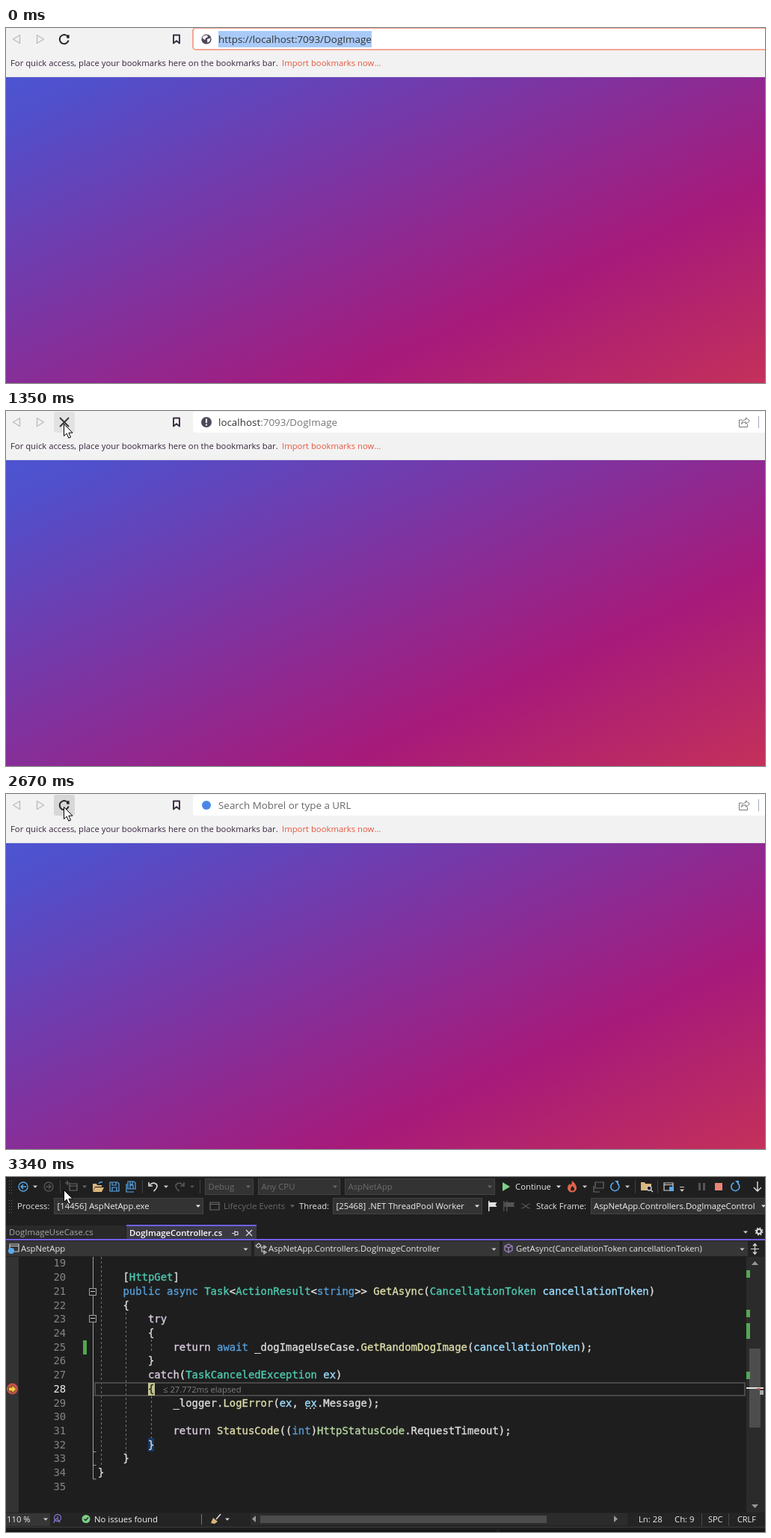
An HTML page that plays this animation: 1015x476 px, repeating every 4.84 s.

```html
<!DOCTYPE html>
<html lang="en">
<head>
<meta charset="utf-8">
<title>Cancelled request</title>
<style>
html, body { margin: 0; width: 100%; height: 100%; overflow: hidden; background: #1f1f1f; }
svg { display: block; width: 1015px; height: 476px; }
text { white-space: pre; font-family: "Open Sans", "Noto Sans", sans-serif; }
.code { font-family: "DejaVu Sans Mono", monospace; font-size: 13.91px; stroke-width: .35; }
</style>
</head>
<body>
<svg id="stage" viewBox="0 0 1015 476" xmlns="http://www.w3.org/2000/svg">
  <defs>
    <linearGradient id="sky" gradientUnits="userSpaceOnUse" x1="0" y1="66" x2="336" y2="792">
      <stop offset="0" stop-color="#4d54d1"/>
      <stop offset=".065" stop-color="#5050cc"/>
      <stop offset=".7" stop-color="#a71a7a"/>
      <stop offset="1" stop-color="#c4315a"/>
    </linearGradient>
  </defs>
</svg>
<script>
const stage = document.getElementById('stage');
const LOOP = 4840;
const groups = {};
let g = stage;

function el(tag, attrs, text, parent = g) {
  const node = document.createElementNS(stage.namespaceURI, tag);
  for (const k in attrs) node.setAttribute(k, attrs[k]);
  if (text) node.textContent = text;
  return parent.appendChild(node);
}
function group(name, parent = stage) {
  g = groups[name] = el('g', {}, '', parent);
}
const rect = (x, y, width, height, fill, more) => el('rect', { x, y, width, height, fill, ...more });
const dot = (cx, cy, r, fill, more) => el('circle', { cx, cy, r, fill, ...more });
const line = (d, stroke, w = 1, more) => el('path', { d, stroke, 'stroke-width': w, fill: 'none', ...more });
const fill = (d, color, more) => el('path', { d, fill: color, ...more });
const label = (x, y, str, color, size = 11.3, more) => el('text', { x, y, fill: color, 'font-size': size, ...more }, str);
const caret = (x, y, color = '#d0d0d0') => fill(`M${x - 3} ${y - 1.5}h6l-3 3.2z`, color);
const ring = (x, y, r, color) => dot(x, y, r, 'none', { stroke: color, 'stroke-width': 1.3 });
const frame = (x, y, w, h, bg, stroke, more) => rect(x + .5, y + .5, w - 1, h - 1, bg, { stroke, ...more });

/* ---------- browser ---------- */
function browser() {
  group('browser');
  const top = g;
  rect(0, 0, 1015, 66, '#f2f2f2');
  rect(0, 65, 1015, 1, '#dcdce4');
  rect(0, 66, 1015, 410, 'url(#sky)');

  group('hover', top);
  rect(64, 1, 28, 28, '#e2e2e2', { rx: 3 });
  group('press', top);
  rect(64, 1, 28, 28, '#d7d7d7', { rx: 3 });

  g = top;
  line('M18.5 9.5v11l-9-5.5z', '#bdbdbd', 1.4, { 'stroke-linejoin': 'round' });
  line('M41.5 9.5v11l9-5.5z', '#bdbdbd', 1.4, { 'stroke-linejoin': 'round' });
  line('M224 9.5h8v11l-4-3.4-4 3.4z', '#3b2c42', 1.9, { 'stroke-linejoin': 'round' });
  label(6, 51, 'For quick access, place your bookmarks here on the bookmarks bar.', '#38243f');
  label(369, 51, 'Import bookmarks now…', '#e5573f');

  group('reload', top);
  line('M83.6 16.5a6 6 0 1 1-3.3-6.8', '#262626', 2);
  fill('M80 9.2h4.6v4.6h-3z', '#262626');
  group('stop', top);
  line('M72 9l12 12M84 9l-12 12', '#333', 1.8);

  group('focused', top);
  rect(250, 0, 780, 29, '#fff', { rx: 4, stroke: '#f6a795', 'stroke-width': 2 });
  rect(284, 4, 205, 22, '#a9caf8');
  label(284, 20, 'https://localhost:7093/DogImage', '#333', 13.42);
  dot(268, 15, 6.6, '#50465a');
  fill('M264 10.5l5-1 1 2.5-3 1.5-1 2.5-3.5-2.5zM269 15l4.5-1.5-1 4-3 2.5z', '#fff');

  group('idle', top);
  const idle = g;
  rect(250, 1, 780, 28, '#fff', { rx: 4 });
  line('M984.5 12h-4v9.5h11v-4M983.5 17.5q1-6 6-6v-2.5l5 4.2-5 4.2v-2.7q-4-.2-6 2.8z', '#777');
  rect(1006, 7, 1, 16, '#a4a8c0');

  group('visited', idle);
  dot(268, 15, 7, '#4f4a5a');
  rect(267, 10.5, 2, 5.5, '#fff');
  rect(267, 17.5, 2, 2, '#fff');
  const url = label(284, 20, '', '#777', 13.42);
  el('tspan', { fill: '#333' }, 'localhost', url);
  el('tspan', {}, ':7093/DogImage', url);

  group('search', idle);
  dot(268, 15, 6, '#4a86e8');
  label(284, 20, 'Search Mobrel or type a URL', '#686868', 13.42);

  group('tip', top);
  frame(87, 32, 136, 25, '#fff', '#4a4a4a');
  label(95, 49, 'Stop loading this page', '#444');
}

/* ---------- editor ---------- */
const INK = {
  p: '#dcdcdc', b: '#569cd6', c: '#dacbe0', t: '#4ec9b0',
  e: '#b8d7a3', m: '#dcdcaa', v: '#9cdcfe', dark: '#2b2b20'
};
const CODE = [
  [20, 8, 'p[|tHttpGet|p]'],
  [21, 8, 'bpublic async |tTask|p<|tActionResult|p<|bstring|p>> |mGetAsync|p(|tCancellationToken |vcancellationToken|p)'],
  [22, 8, 'p{'],
  [23, 12, 'ctry'],
  [24, 12, 'p{'],
  [25, 16, 'creturn |bawait |p_dogImageUseCase.|mGetRandomDogImage|p(|vcancellationToken|p);'],
  [26, 12, 'p}'],
  [27, 12, 'ccatch|p(|tTaskCanceledException |vex|p)'],
  [28, 12, 'p{'],
  [29, 16, 'p_logger.|mLogError|p(|vex|p, |vex|p.Message);'],
  [31, 16, 'creturn |mStatusCode|p((|bint|p)|eHttpStatusCode|p.RequestTimeout);'],
  [32, 12, 'p}'],
  [33, 8, 'p}'],
  [34, 4, 'p}']
];
const rowY = n => Math.round(120.4 + 18.72 * (n - 19));
const colX = c => 89.4 + 8.376 * c;

function codeRow(n, col) {
  return el('text', { class: 'code', x: colX(col), y: rowY(n) });
}
const token = (row, str, color) => el('tspan', { fill: color, stroke: color }, str, row);

function combo(x, y, w, str, color, arrow = color) {
  frame(x, y, w, 22, '#333', '#434343');
  label(x + 4.5, y + 15, str, color);
  caret(x + w - 7, y + 11, arrow);
}
function grip(y) {
  for (let i = 0; i < 10; i++) rect(4 + (i % 2) * 3, y + (i >> 1) * 4, 1, 1, '#666');
}
function turn(x, color) {
  line(`M${x + 3.5} 8.5a5.5 5.5 0 1 1-5-.7`, color, 1.6);
  fill(`M${x} 5h5v5z`, color);
}
function disk(x, y, s, color) {
  line(`M${x} ${y}h${s - 2}l2 2v${s - 2}h${-s}zM${x + 3} ${y}v4h${s - 7}v-4M${x + 3} ${y + s}v-5h${s - 6}v5`, color, 1.2);
}
function flag(x, color) {
  fill(`M${x - 4.5} 34h10l-2 3 2 3h-10zM${x - 6} 32h1.5v14h-1.5z`, color);
}
function windowIcon(x, y, color) {
  line(`M${x - 6} ${y - 5}h12v10h-12zM${x - 6} ${y - 2.5}h12`, color, 1.2);
}

function toolbars() {
  const blue = '#58aaf0', dim = '#6b6b6b', soft = '#d2d2d2';
  grip(5);
  grip(31);
  ring(23, 13, 6, blue);
  line('M27 13h-7M23 10l-3 3 3 3', blue, 1.4);
  caret(39, 13);
  ring(57, 13, 6, '#555');
  line('M53 13h7M57 10l3 3-3 3', '#555', 1.4);
  for (const x of [72, 182, 259, 841, 871]) rect(x, 4, 1, 18, '#424242');
  line('M85 9h10v9h-10zM85 12h10M82 5v6M79 8h6', dim, 1.2);
  caret(105, 13, dim);
  fill('M116 9h5l1 2h6v2h-9l-3 6zM119 14h12l-3 6h-12z', '#dcb67a');
  line('M124 9q1-3 5-2', blue, 1.4);
  disk(139, 7, 12, blue);
  disk(163, 6, 10, blue);
  line('M161 9v11h10', blue, 1.2);
  line('M191 7v5h5M191.5 11.5q5-6 10-1.5 2 4-4 9', soft, 1.7);
  caret(214, 13);
  line('M238 7v5h-5M237.5 11.5q-5-6-10-1.5-2 4 4 9', '#555', 1.7);
  caret(249, 13, '#555');
  combo(266, 2, 65, 'Debug', dim);
  combo(337, 2, 110, 'Any CPU', dim);
  combo(453, 2, 201, 'AspNetApp', dim);
  fill('M757 5q6 5 6 10a6 5.5 0 0 1-12 0q0-4 3-6l1 2q2-2 2-6z', '#e0644c');
  fill('M757.5 12q3 3 2.5 5-3 3-5 0 0-3 2.5-5z', '#1f1f1f');
  caret(774, 13);
  line('M788 7h11v8h-11zM786 12v8h8', dim, 1.2);
  turn(814, blue);
  caret(831, 13);
  fill('M849 7h5l1 2h8v9h-14z', '#dcb67a');
  dot(860, 15, 3, '#1f1f1f', { stroke: soft, 'stroke-width': 1.3 });
  line('M862 17l3 3', soft, 1.5);
  windowIcon(886, 13, soft);
  rect(887, 13, 6, 6, blue);
  rect(901, 13, 6, 1, soft);
  caret(904, 18);
  rect(948, 8, 10, 10, '#ec8377');
  turn(975, blue);

  label(15, 43, 'Process:', '#e2e2e2');
  combo(64, 28, 200, '[14456] AspNetApp.exe', '#f0f0f0');
  windowIcon(279, 39, dim);
  label(291, 43, 'Lifecycle Events', dim);
  caret(383, 39, dim);
  flag(671, '#4c4c4c');
  flag(675, '#555');
  line('M689 36q3 0 6 3t6 3M689 42q3 0 6-3t6-3', '#555', 1.2);
}

function debugState(name, ink, play, pause, thread, stack, flagColor, down) {
  group(name, groups.editor);
  fill('M664 7v12l10-6z', play);
  label(681, 17, 'Continue', ink);
  caret(739, 13, ink);
  rect(926, 8, 3, 10, pause);
  rect(932, 8, 3, 10, pause);
  line('M1005 6v13M1000 14l5 5 5-5', down, 1.4);
  label(392, 43, 'Thread:', ink);
  combo(437, 28, 200, thread, '#f0f0f0', ink);
  flag(651, flagColor);
  label(709, 43, 'Stack Frame:', ink);
  frame(782, 28, 240, 22, '#333', '#434343');
  label(786, 43, stack, '#f0f0f0');
  caret(1013, 39, ink);
}

function tabs() {
  rect(0, 65, 160, 18, '#292929');
  label(4, 78, 'DogImageUseCase.cs', '#a8a8a8');
  rect(161, 64, 174, 21, '#3b3a44');
  rect(161, 64, 174, 2, '#7160e8');
  rect(0, 83, 1015, 2, '#7160e8');
  label(165, 79, 'DogImageController.cs', '#fff', 11.3, { 'font-weight': 600 });
  line('M302 75.5h4M306 72v7M306 73.5h4v4h-4', '#ddd', 1.1);
  line('M321 71l8 8M329 71l-8 8', '#ddd', 1.3);
  caret(989, 74);
  dot(1007, 73, 3, 'none', { stroke: '#ddd', 'stroke-width': 2 });
  dot(1007, 73, 4.7, 'none', { stroke: '#ddd', 'stroke-width': 1.5, 'stroke-dasharray': '1.85' });

  rect(0, 85, 1015, 22, '#222');
  for (const x of [0, 332, 664]) {
    rect(x, 86, 328, 20, '#363636');
    caret(x + 320.5, 97);
  }
  windowIcon(11, 95, '#ccc');
  dot(7, 99, 4, '#58aaf0');
  label(20, 100, 'AspNetApp', '#e6e6e6');
  line('M334 92l4-3 3 3-4 3zM340 94h5M342 94v6h3M345 92l3 2-3 2zM345 99l3 2-3 2z', '#ccc', 1.2);
  label(351, 100, 'AspNetApp.Controllers.DogImageController', '#e6e6e6');
  line('M672 90l5 2.5v6l-5 2.5-5-2.5v-6zM667 92.5l5 2.5 5-2.5M672 95v6', '#a88bd0', 1.2);
  label(682, 100, 'GetAsync(CancellationToken cancellationToken)', '#e6e6e6');
  line('M996 96.5h11M1001.5 90v13M999 92.5l2.5-3 2.5 3M999 100.5l2.5 3 2.5-3', '#ddd', 1.2);
}

function margins() {
  rect(0, 107, 17, 343, '#333');
  line('M116.5 107V405h4M116.5 386.5h4M116.5 368.5h4', '#a0a0a0');
  for (const y of [154, 190]) {
    frame(111, y - 5, 10, 10, '#1e1e1e', '#a0a0a0');
    line(`M113 ${y - .5}h6`, '#d0d0d0');
  }
  line('M127.5 107V388M160.5 182V370M194.5 218V236M194.5 294V350', '#757575', 1, { 'stroke-dasharray': '3 3' });
  rect(103, 219, 5, 19, '#4fa850');
  rect(119, 276, 869, 17, 'none', { stroke: '#484848', 'stroke-width': 2 });
  rect(190, 350, 8, 18, '#173a66');
  for (let n = 19; n <= 35; n++)
    el('text', { class: 'code', x: 63.5, y: rowY(n), fill: n === 28 ? '#f0f0f0' : '#858585' }, n);
  dot(8.5, 284, 7.5, '#c8534f');
}

function code() {
  for (const [n, col, parts] of CODE) {
    const row = codeRow(n, col);
    for (const part of parts.split('|')) token(row, part.slice(1), INK[part[0]]);
  }
  for (let i = 0; i < 3; i++) rect(401 + i * 5, 309, 2, 2, '#aaa');
}

function edges() {
  rect(990, 107, 25, 343, '#2b2b2b');
  rect(994, 230, 15, 106, '#4d4d4d');
  fill('M997 118h9l-4.5-5z', '#999');
  fill('M997 439h9l-4.5 5z', '#999');
  for (const [y, h] of [[125, 10], [178, 10], [196, 21], [261, 10]]) rect(990, y, 5, h, '#55a655');
  rect(990, 282, 23, 2, '#e6e6e6');
  rect(1004, 283, 5, 2, '#c8534f');
  rect(1008, 286, 5, 6, '#aaa');

  rect(0, 450, 1015, 20, '#242424');
  rect(0, 451, 59, 17, '#363636');
  label(1, 463, '110 %', '#f0f0f0');
  caret(53, 459);
  ring(69, 457, 4.5, '#8272c8');
  line('M64 464q1-6 5-6v-3M69 459l3 4', '#8272c8', 1.3);
  dot(107, 458.5, 5.5, '#7fcf86');
  line('M104.5 458.5l2 2 3.5-4', '#222', 1.4);
  label(118, 463, 'No issues found', '#f5f5f5');
  rect(261, 452, 1, 14, '#777');
  line('M287 452l-6 7', '#ddd', 1.6);
  fill('M277 457l6 5-4 3-5-1z', '#dcb67a');
  caret(296, 459);
  rect(327, 451, 504, 16, '#2c2c2c');
  rect(340, 454, 383, 10, '#4d4d4d');
  fill('M334 454v9l-5-4.5z', '#999');
  fill('M813 454v9l5-4.5z', '#999');
  label(846, 463, 'Ln: 28', '#f0f0f0');
  label(894, 463, 'Ch: 9', '#f0f0f0');
  rect(930, 451, 1, 17, '#484848');
  rect(966, 451, 1, 17, '#484848');
  label(939, 463, 'SPC', '#f0f0f0', 10.9);
  label(978, 463, 'CRLF', '#f0f0f0', 10.9);
  rect(0, 469, 1015, 1, '#3c3c3c');
  rect(0, 473, 656, 3, '#171717');
  rect(661, 473, 354, 3, '#171717');
}

function editor() {
  group('editor');
  const top = g;
  rect(0, 0, 1015, 476, '#1f1f1f');
  rect(0, 107, 1015, 343, '#1e1e1e');
  toolbars();
  tabs();
  margins();
  group('mark', top);
  rect(190, 276, 9, 17, '#6b2f34');
  g = top;
  code();
  group('hit', top);
  rect(190, 276, 9, 17, '#c3c394');
  token(codeRow(28, 12), '{', INK.dark);
  fill('M3.5 282h4.5v-3l6 5.5-6 5.5v-3h-4.5z', '#f7c948', { stroke: '#5a4314', 'stroke-width': .9 });
  group('elapsed', top);
  label(210, 289, '≤ 27.772ms elapsed', '#808080');
  g = top;
  edges();
  debugState('running', '#777', '#666', '#d6d6d6', '', '', '#5c5c5c', '#555');
  debugState('paused', '#e6e6e6', '#7fd087', '#555',
    '[25468] .NET ThreadPool Worker', 'AspNetApp.Controllers.DogImageControl', '#e0e0e0', '#e0e0e0');
}

browser();
editor();
group('pointer');
fill('M0 0V16L3.7 12.6L6.3 18.7L9 17.6L6.4 11.7H11.5Z', '#fff', { stroke: '#000' });

/* name: [from, to] in ms */
const SPANS = {
  browser: [0, 2810], editor: [2810, LOOP],
  focused: [0, 1000], idle: [1000, LOOP], visited: [1000, 2480], search: [2480, LOOP],
  stop: [1000, 2670], hover: [1280, 2350], press: [2350, LOOP], tip: [1890, 2350],
  pointer: [1070, LOOP], mark: [2810, 2950], hit: [2950, LOOP],
  running: [2810, 3010], paused: [3010, LOOP], elapsed: [3270, LOOP]
};
const show = (name, on) => { groups[name].style.display = on ? '' : 'none'; };

function draw(t) {
  for (const name in SPANS) show(name, t >= SPANS[name][0] && t < SPANS[name][1]);
  show('reload', t < 1000 || t >= 2670);
  const p = Math.min(1, Math.max(0, Math.floor((t - 1000) / 70) / 5));
  const rest = (1 - p) ** 2;
  groups.pointer.setAttribute('transform', `translate(${77.5 + 110 * rest} ${17.5 - 3 * rest})`);
  groups.elapsed.style.opacity = t < 3340 ? .5 : 1;
}

const start = performance.now();
function tick() {
  draw((performance.now() - start) % LOOP);
  requestAnimationFrame(tick);
}
tick();
</script>
</body>
</html>
```
